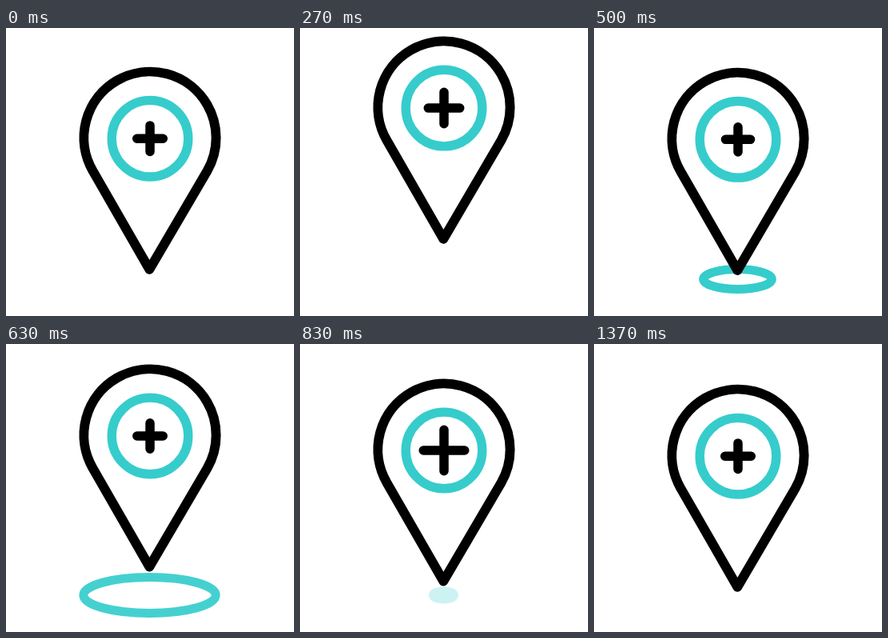
Recreate the animation shown at these times as an HTML page with a canvas. Size 360 by 360 pixels, loop 1670 ms.

```html
<!DOCTYPE html>
<html>
<head>
<meta charset="utf-8">
<style>
html, body { margin: 0; width: 100%; height: 100%; overflow: hidden; background: #fff; }
canvas { display: block; width: 360px; height: 360px; }
</style>
</head>
<body>
<canvas id="stage" width="360" height="360"></canvas>
<script>
const ctx = document.getElementById('stage').getContext('2d');
const LOOP = 1670, LAST_STEP = 41;
const BLACK = '#000', TEAL = '#36cccc';
const CX = 180;

// [step, value] keys at 30 steps per second, eased by a half cosine
const HEIGHT = [[0, 138.2], [7.1, 98.5], [14.3, 140.2], [20.8, 109.5], [27, 140.2]];
const ARM = [[0, 16.3], [5, 26], [10.5, 15], [20.5, 16.3]];

function ease(keys, k) {
  for (let i = 1; i < keys.length; i++) {
    const [k0, v0] = keys[i - 1], [k1, v1] = keys[i];
    if (k <= k1) return v0 + (v1 - v0) * (1 - Math.cos(Math.PI * (k - k0) / (k1 - k0))) / 2;
  }
  return keys[keys.length - 1][1];
}

function stroke(color, width, trace) {
  ctx.strokeStyle = color;
  ctx.lineWidth = width;
  ctx.beginPath();
  trace();
  ctx.stroke();
}

function ripple(age) {
  if (age < 0 || age >= 11) return;
  ctx.globalAlpha = Math.min(1, (age + 1) * 0.25, (11 - age) * 0.23);
  stroke(TEAL, 11, () =>
    ctx.ellipse(179.5, 314, 13 + 9.95 * age, 5 + 2.5 * age, 0, 0, Math.PI * 2));
  ctx.globalAlpha = 1;
}

// Circle joined to its tip by two tangents
function pin(y) {
  const r = 82.6, drop = 164.6;
  const spread = Math.acos(r / drop);
  stroke(BLACK, 11.9, () => {
    ctx.arc(CX, y, r, Math.PI / 2 + spread, Math.PI / 2 - spread + Math.PI * 2);
    ctx.lineTo(CX - 0.7, y + drop);
    ctx.closePath();
  });
}

function plus(y, arm) {
  stroke(BLACK, 11.5, () => {
    ctx.moveTo(CX - arm, y);
    ctx.lineTo(CX + arm, y);
    ctx.moveTo(CX, y - arm);
    ctx.lineTo(CX, y + arm);
  });
}

function draw(ms) {
  const k = Math.min(LAST_STEP, Math.floor(ms * 0.03 + 0.11));
  const y = ease(HEIGHT, k);
  ctx.fillStyle = '#fff';
  ctx.fillRect(0, 0, 360, 360);
  ctx.lineCap = ctx.lineJoin = 'round';
  ripple(k - 12);
  ripple(k - 25);
  pin(y - 1);
  stroke(TEAL, 11.4, () => ctx.arc(CX, y, 47.8, 0, Math.PI * 2));
  plus(y, ease(ARM, k % 20.5));
}

const start = performance.now();
function tick() {
  draw((performance.now() - start) % LOOP);
  requestAnimationFrame(tick);
}
tick();
</script>
</body>
</html>
```
